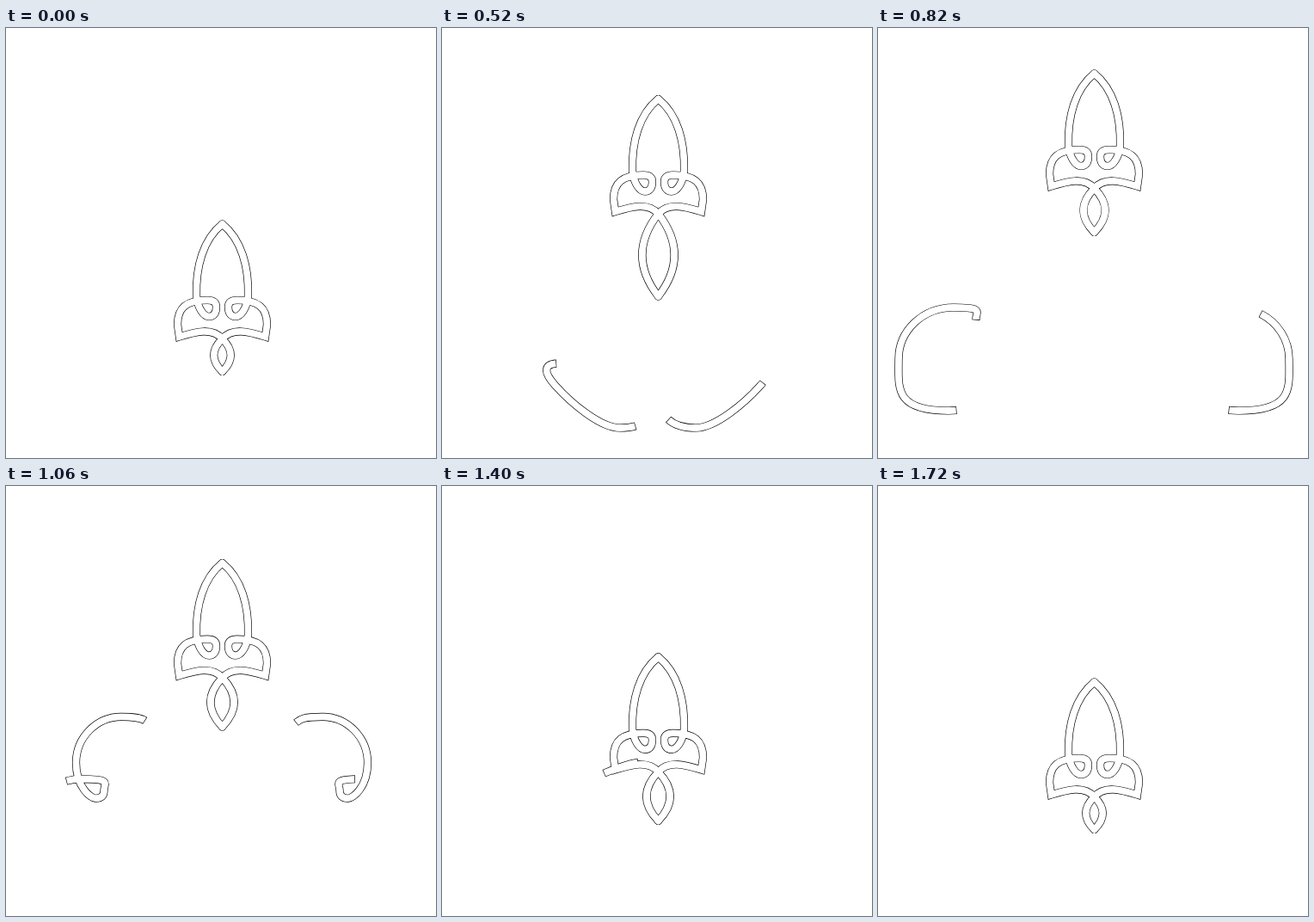
Animation of 500x500 px, one loop 1740 ms. Source, as an HTML page with a canvas:

```html
<!DOCTYPE html>
<html lang="en">
<head>
<meta charset="utf-8">
<title>Rocket</title>
<style>
  html, body { margin: 0; width: 100%; height: 100%; overflow: hidden; background: #fff; }
  canvas { display: block; width: 500px; height: 500px; }
</style>
</head>
<body>
<canvas id="stage" width="500" height="500"></canvas>
<script>
const ctx = document.getElementById('stage').getContext('2d');
const LOOP = 1740, STEP = 20, PEAK = 820;
const ROCKET_AXIS = 251.5, TRAIL_AXIS = 251;
const OUTER = 9.1, INNER = 7.8;

// Left half of the rocket: nose, side, curl, fin.
const HULL = new Path2D(`M251.5 228 C229 246 220.5 278 221.5 312
  C223 326 230 335.5 236 335.5 S244.5 331 244.5 324.5 S240 316.5 234 316.5
  C210 316.5 199.5 325 199.5 345 L201.5 359 C221 353 240 348 251.5 361.5`);
const TAIL_Y = 361.5;

// Left trail: out of the flame, two curls, then back into the fin.
const SWIRL = new Path2D(`M252 425 C247 458 230 465 207 465 S150 436 132 416 S122 390 136 390
  S146 445 82 445 S24 418 24 385 S52 325 88 325 S114 330 114 338 S109 347.5 104 347.5
  S81.5 335 81.5 306 S105 252.7 134 252.7 S160 257 172 265 S196 300 180 300
  S164 282 187 272 S241 249 252 269`);
const SWIRL_END = 883;

// Distances travelled along the swirl at the three main poses.
const POSES = [520, PEAK, 1060];
const TRAILS = [
  { side: 1, end: 1472, head: [195, 532, 708], tail: [50, 287, 477] },
  { side: -1, end: 1395, head: [163, 462, 712], tail: [34, 284, 503] }
];

// Goes from 0 to 1 between two times; a higher power is steeper in the middle.
function swing(t, from, to, power) {
  const s = Math.min(1, Math.max(0, (t - from) / (to - from)));
  return s ** power / (s ** power + (1 - s) ** power);
}

function travel(t, marks, end) {
  const times = [330, ...POSES, end], places = [0, ...marks, SWIRL_END];
  if (t <= times[0]) return 0;
  if (t >= end) return SWIRL_END;
  const i = times.findIndex(time => time > t);
  const s = (t - times[i - 1]) / (times[i] - times[i - 1]);
  return places[i - 1] + s * (places[i] - places[i - 1]);
}

function flamePath(t) {
  const len = 38 + 58 * swing(t, 0, 320, 2) - 45 * swing(t, 520, PEAK, 2) +
    6 * swing(t, PEAK, 1060, 2) - 19 * swing(t, 1400, 1720, 1.6);
  const half = 9.8 + 9.6 * Math.log(len / 38);
  const x = ROCKET_AXIS - half / 0.75;
  const path = new Path2D();
  path.moveTo(ROCKET_AXIS, TAIL_Y);
  path.bezierCurveTo(x, TAIL_Y + len / 3, x, TAIL_Y + len * 2 / 3, ROCKET_AXIS, TAIL_Y + len);
  return path;
}

function onSide(side, axis, y, paint) {
  ctx.save();
  ctx.translate(axis, y);
  ctx.scale(side, 1);
  ctx.translate(-axis, 0);
  paint();
  ctx.restore();
}

function strokeTrail(from, to) {
  ctx.lineCap = 'butt';
  ctx.setLineDash([to - from, 2 * SWIRL_END]);
  ctx.lineDashOffset = -from;
  ctx.stroke(SWIRL);
}

function draw(t) {
  const height = 175 * (swing(t, 0, PEAK, 2.9) - swing(t, PEAK, 1612, 1.6));
  const sink = t > PEAK ? 0.43 * (175 - height) : 0;
  const flame = flamePath(t);

  ctx.fillStyle = '#fff';
  ctx.fillRect(0, 0, 500, 500);
  ctx.lineJoin = 'miter';
  // Black first, then white on top, so crossings merge into one outline.
  for (const [color, width] of [['#000', OUTER], ['#fff', INNER]]) {
    const rim = (width - INNER) / 2;
    ctx.strokeStyle = color;
    ctx.lineWidth = width;
    for (const { side, end, head, tail } of TRAILS) {
      const from = travel(t, tail, end), to = travel(t, head, end);
      if (to - from > 1) onSide(side, TRAIL_AXIS, sink, () => strokeTrail(from - rim, to + rim));
    }
    for (const side of [1, -1]) {
      onSide(side, ROCKET_AXIS, -height, () => {
        ctx.lineCap = 'round';
        ctx.stroke(HULL);
        ctx.stroke(flame);
      });
    }
  }
}

const start = performance.now();
function tick() {
  const t = (performance.now() - start) % LOOP;
  draw(Math.floor(t / STEP) * STEP);
  requestAnimationFrame(tick);
}
tick();
</script>
</body>
</html>
```
